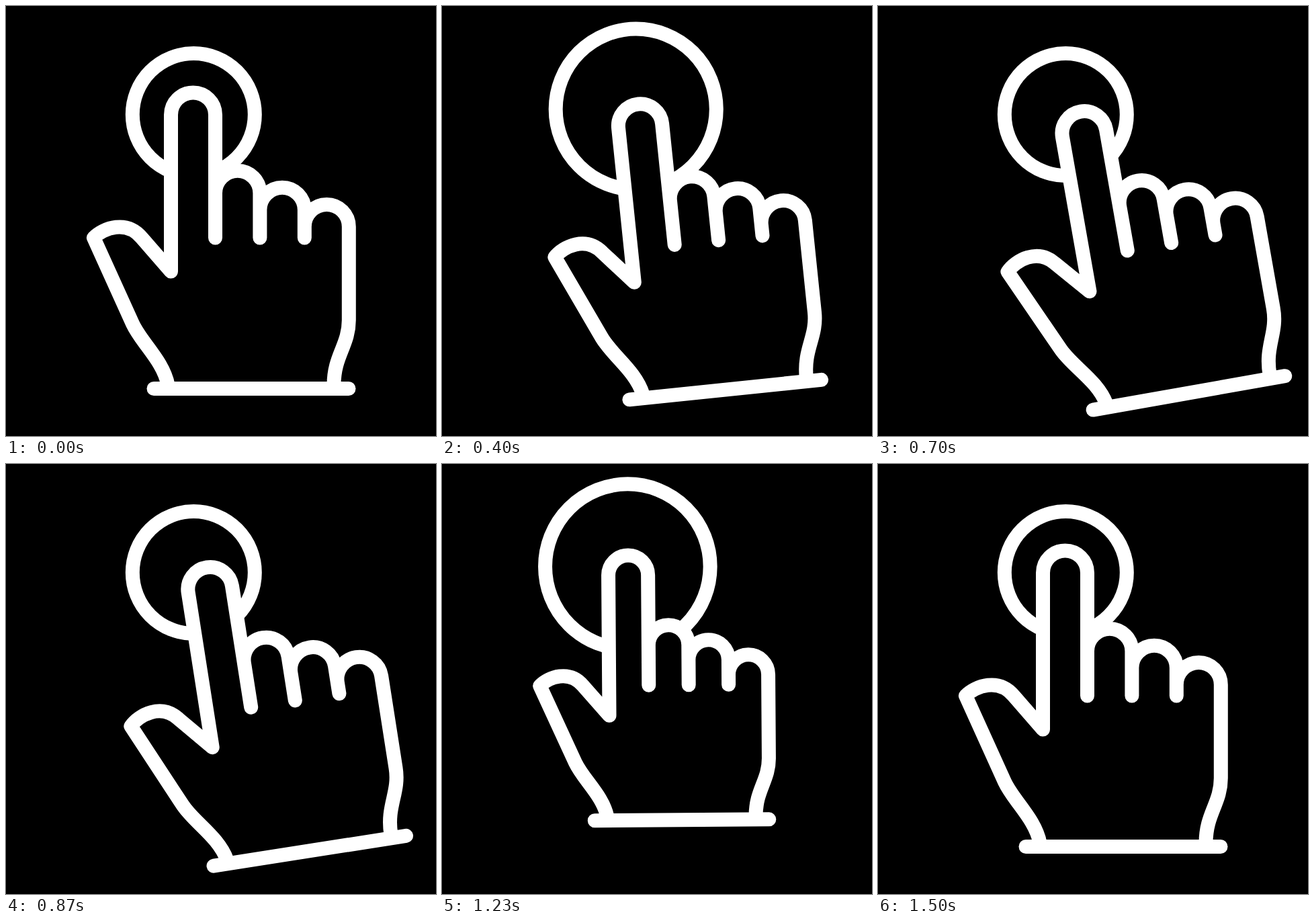
Animation of 640x640 px, one loop 1.67 s. Source, as an HTML page:

```html
<!DOCTYPE html>
<html>
<head>
<meta charset="utf-8">
<style>
  html, body { margin: 0; height: 100%; overflow: hidden; background: #000; }
  svg { display: block; width: 100%; height: 100%; }
</style>
</head>
<body>
<svg viewBox="0 0 640 640" fill="#000" stroke="#fff" stroke-width="21" stroke-linecap="round" stroke-linejoin="round">
  <circle id="ring"/>
  <g id="hand">
    <path d="M241 564C234 528 202 502 188.500 473L130.500 345C145 330 180 318 202 345L245.500 395
      V162a33 33 0 0 1 66 0V345V278.500a33.200 33.200 0 0 1 66.400 0V345V303.500a33.200 33.200 0 0 1 66.400 0V345
      V328.500a33 33 0 0 1 66 0V467C510.500 505 488 520 488 564"/>
    <path d="M220 569.500H510"/>
  </g>
</svg>
<script>
const LOOP = 1670, FRAME = 100 / 3;
const ring = document.getElementById('ring');
const hand = document.getElementById('hand');

// Ease in and out along cubic-bezier(.5, 0, .5, 1)
function ease(u) {
  if (u <= 0) return 0;
  if (u >= 1) return 1;
  let lo = 0, hi = 1;
  for (let i = 0; i < 24; i++) {
    const m = (lo + hi) / 2;
    if (1.5 * m * (1 - m) + m ** 3 < u) lo = m; else hi = m;
  }
  return lo * lo * (3 - 2 * lo);
}

const ramp = (f, from, to) => ease((f - from) / (to - from));

// Rises from a to b, stays until c, falls back by d
const pulse = (f, a, b, c, d) => ramp(f, a, b) - ramp(f, c, d);

function draw(f) {
  const swing = pulse(f, 2.4, 20, 21.2, 40);
  const press = 0.152 * (pulse(f, 2, 8, 8, 13) + pulse(f, 29, 35, 35, 40));
  const wave1 = pulse(f, 6.4, 14, 14, 21);
  const wave2 = pulse(f, 29, 38, 38, 45);
  const wave = wave1 + wave2;

  ring.setAttribute('cx', 279.3 + 10.7 * wave1 - 3 * wave2);
  ring.setAttribute('cy', 161.5 - 9 * wave);
  ring.setAttribute('r', 91 + 32.4 * wave);

  const x = 278.5 + 28.5 * swing - 24 * press;
  const y = 162 + 27.6 * swing + 24 * press;
  const scale = 1 - press;
  hand.setAttribute('transform',
    `translate(${x} ${y}) rotate(${-10 * swing}) scale(${scale}) translate(-278.5 -162)`);
  hand.setAttribute('stroke-width', 21 / scale);
}

function tick() {
  const t = performance.now() % LOOP;
  draw(Math.floor((t + 3.5) / FRAME));
  requestAnimationFrame(tick);
}
tick();
</script>
</body>
</html>
```
